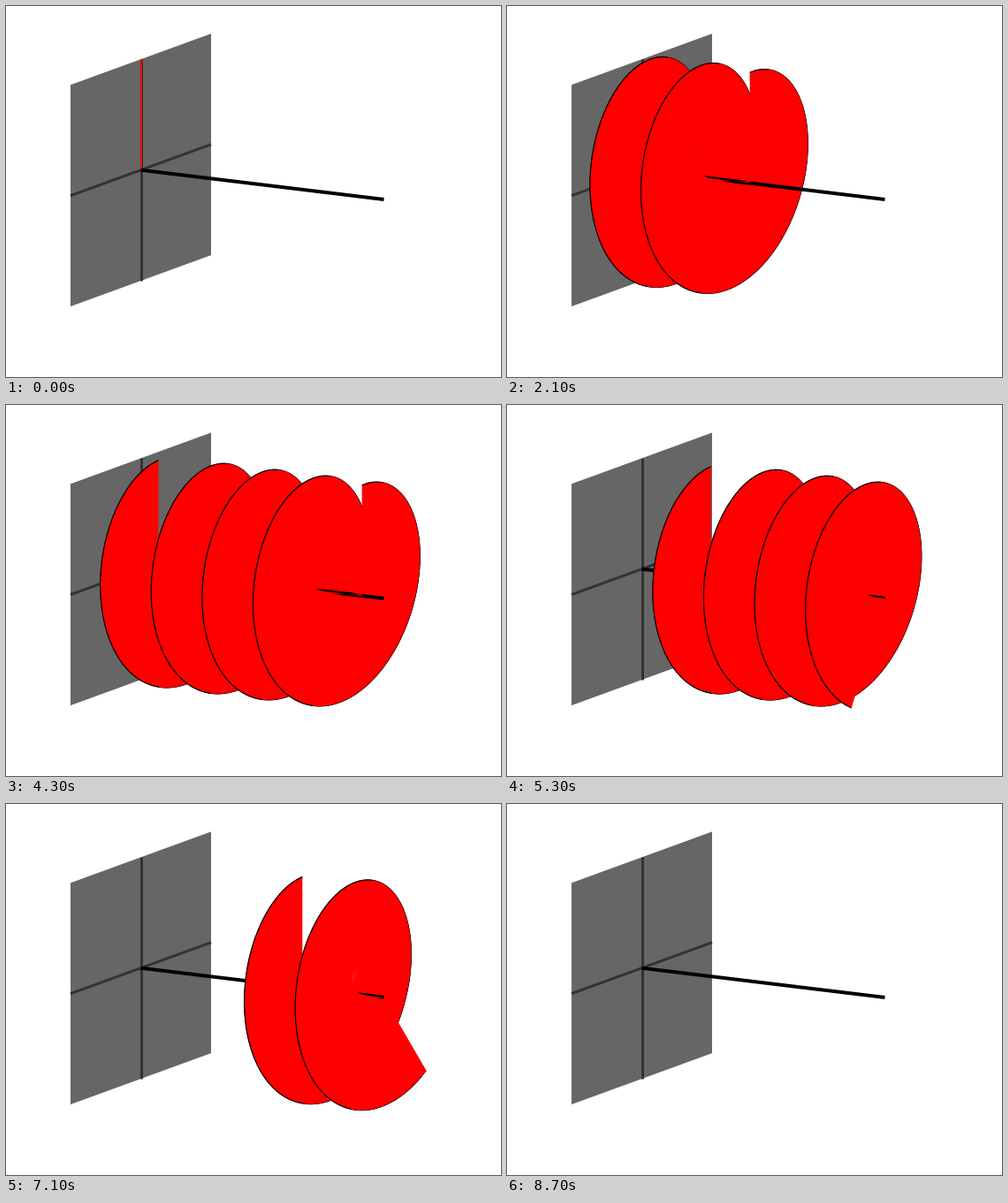
A matplotlib script for the animation above (10000 ms loop, 560 px wide and 420 px high).

```python
import math

import numpy as np
import matplotlib.pyplot as plt
from matplotlib.animation import FuncAnimation
from matplotlib.collections import PolyCollection

WIDTH, HEIGHT, DPI = 560, 420, 100
FRAMES, INTERVAL = 100, 100

# Screen projection: origin, plane half-axes and propagation axis.
ORIGIN = np.array([152.5, 185.7])
SIDE = np.array([79.5, -29.0])
UP = np.array([0.0, -125.4])
AXIS = np.array([275.0, 33.3])

AXIS_TURNS = 15 / math.pi       # axis length measured in wavelengths
PULSE_TURNS = 4
TURNS_PER_FRAME = 10 / (FRAMES - 1)
STEPS_PER_TURN = 100
DEPTH_SLOPE = np.array([-1.77, -0.21])  # nearness gradient inside the disc

AXIS_WIDTH, GRID_WIDTH, RIM_WIDTH = 4.0, 3.0, 1.1
RED, BLACK = "#ff0000", "#000000"


def px(size):
    return size * 72 / DPI


def on_axis(turns):
    return ORIGIN + np.multiply.outer(np.asarray(turns) / AXIS_TURNS, AXIS)


def on_rim(turns, time):
    phase = 2 * np.pi * (time - turns)
    return (on_axis(turns) + np.multiply.outer(np.sin(phase), SIDE)
            + np.multiply.outer(np.cos(phase), UP))


def normal(a, b):
    dx, dy = b - a
    return np.array([dy, -dx]) / math.hypot(dx, dy)


def stroke(a, b, width):
    off = normal(a, b) * width / 2
    return [a + off, b + off, b - off, a - off]


def helicoid(time):
    """Polygons and colours of axis, sheet and rim, ordered back to front."""
    polys, colors = [], []

    def add(poly, color):
        polys.append(poly)
        colors.append(color)

    def add_axis(start, end):
        if end > start:
            add(stroke(on_axis(start), on_axis(end), AXIS_WIDTH), BLACK)

    back = max(0.0, time - PULSE_TURNS)
    front = min(AXIS_TURNS, time)
    if front <= back:
        add_axis(0, AXIS_TURNS)
        return polys, colors

    add_axis(0, back)
    count = max(2, math.ceil((front - back) * STEPS_PER_TURN))
    turns = np.linspace(back, front, count + 1)
    core, rim = on_axis(turns), on_rim(turns, time)
    for i in range(count):
        j, k = max(i - 1, 0), i + 1     # overlap hides seams
        edge = stroke(rim[j], rim[k], RIM_WIDTH)
        outward = -normal(rim[j], rim[k])
        inner_is_nearer = outward @ DEPTH_SLOPE < 0
        add(stroke(core[j], core[k], AXIS_WIDTH), BLACK)
        if inner_is_nearer:
            add(edge, BLACK)
        add([core[j], rim[j], rim[i], rim[k], core[k]], RED)
        if not inner_is_nearer:
            add(edge, BLACK)
    add_axis(front, AXIS_TURNS)
    return polys, colors


fig = plt.figure(figsize=(WIDTH / DPI, HEIGHT / DPI), dpi=DPI, facecolor="white")
ax = fig.add_axes([0, 0, 1, 1])
ax.set_xlim(0, WIDTH)
ax.set_ylim(HEIGHT, 0)
ax.axis("off")

corners = [ORIGIN + s * SIDE + u * UP for s, u in ((-1, 1), (1, 1), (1, -1), (-1, -1))]
ax.add_patch(plt.Polygon(corners, facecolor="#666666", edgecolor="none", zorder=1))
for arm in (SIDE, UP):
    ax.plot(*zip(ORIGIN - arm, ORIGIN + arm), color="#333333", lw=px(GRID_WIDTH),
            solid_capstyle="butt", zorder=2)
first_ray, = ax.plot(*zip(ORIGIN, ORIGIN + UP), color=RED, lw=px(1.8),
                     solid_capstyle="butt", zorder=3)
wave = PolyCollection([], edgecolors="none", linewidths=0, zorder=4)
ax.add_collection(wave, autolim=False)


def update(frame):
    polys, colors = helicoid(frame * TURNS_PER_FRAME)
    wave.set_verts(polys)
    wave.set_facecolor(colors)
    first_ray.set_visible(frame == 0)
    return wave, first_ray


anim = FuncAnimation(fig, update, frames=FRAMES, interval=INTERVAL,
                     repeat=True, repeat_delay=0)
plt.show()
```
